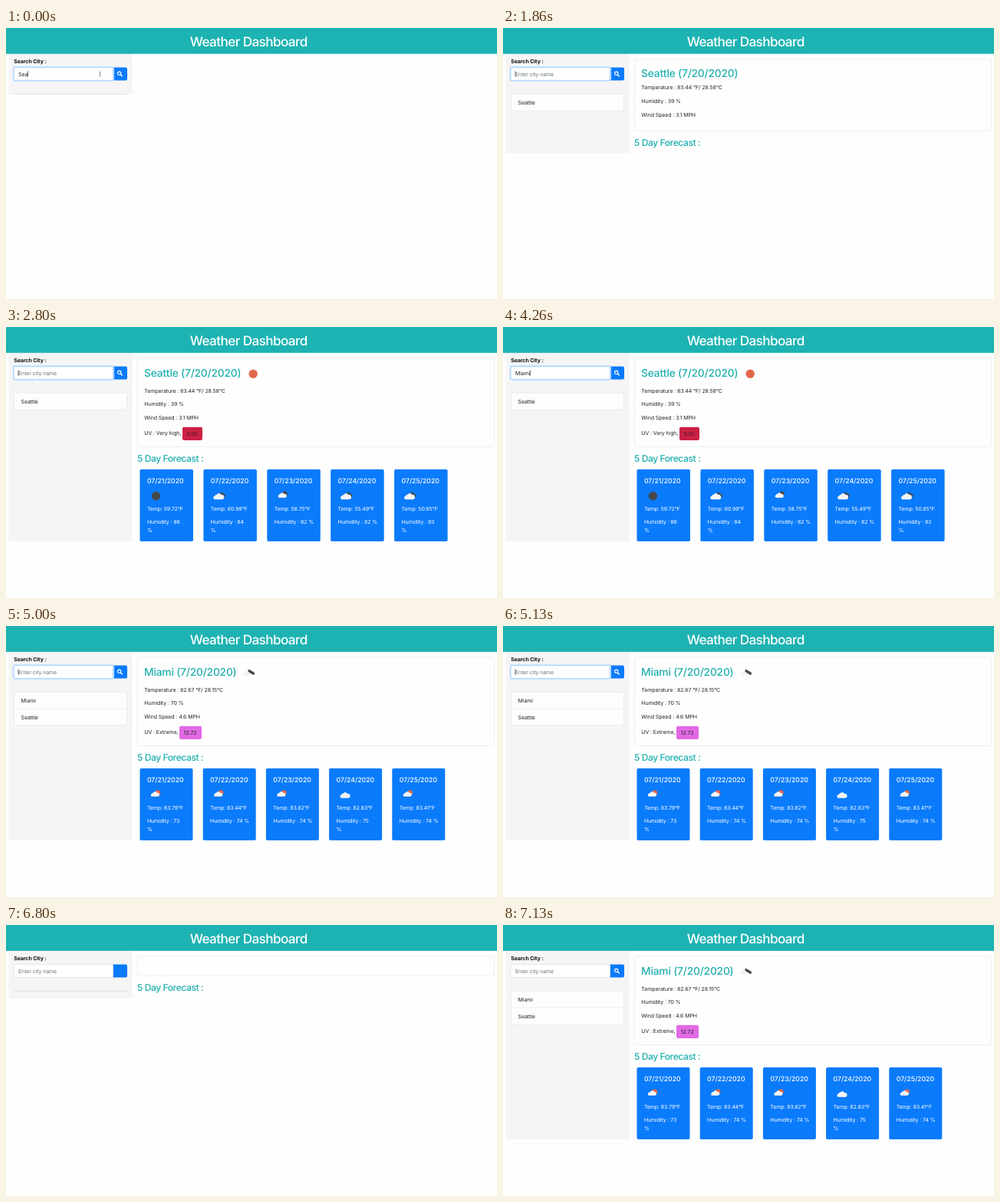
Animation of 640x354 px, one loop 8000 ms. Source, as an HTML page:

```html
<!DOCTYPE html>
<html lang="en">
<head>
<meta charset="utf-8">
<title>Weather Dashboard</title>
<style>
  html, body { margin: 0; width: 100%; height: 100%; overflow: hidden; background: #fefefe; }
  svg { display: block; width: 640px; height: 354px; }
  text {
    font: 400 7px Inter, "Liberation Sans", sans-serif;
    letter-spacing: -.014em;
    fill: #212529;
    text-rendering: geometricPrecision;
    white-space: pre;
  }
  .h1 { font-size: 17.2px; font-weight: 500; letter-spacing: -.036em; fill: #fff; text-anchor: middle; }
  .h2 { font-size: 13.8px; font-weight: 500; letter-spacing: -.014em; fill: #1fb0ae; }
  .h3 { font-size: 12.1px; font-weight: 500; letter-spacing: -.036em; fill: #1fb0ae; }
  .label { font-weight: 700; fill: #111; }
  .hint { fill: #6c757d; }
  .date { font-size: 8.7px; font-weight: 500; letter-spacing: 0; fill: #fff; }
  .white { fill: #fff; }
</style>
</head>
<body>
<svg id="stage" viewBox="0 0 640 354"></svg>
<script>
const LOOP = 8000, BLUE = '#0a7bfb', DARK = '#48484a', SUN = '#e2674a';
const stage = document.getElementById('stage');

const cities = {
  Seattle: {
    lines: ['Temperature : 83.44 °F/ 28.58°C', 'Humidity : 39 %', 'Wind Speed : 3.1 MPH'],
    uv: ['UV : Very high,', '8.05', 230, 26, '#cb2145', '#4a1526'],
    icon: () => disc(322.2, 61.3, 5.7, SUN),
    pitch: 82.9, width: 69.5,
    days: [['moon', 59.72, 86, 1], ['broken', 60.98, 84, 1], ['night', 58.75, 82], ['broken', 55.49, 82], ['broken', 50.85, 83, 1]]
  },
  Miami: {
    lines: ['Temperature : 82.67 °F/ 28.15°C', 'Humidity : 70 %', 'Wind Speed : 4.6 MPH'],
    uv: ['UV : Extreme,', '12.72', 226, 29, '#e069e4', '#212529'],
    icon: () => cloud(314.5, 62, .62, '#f1f1f1') + streak(317, 58.6, 322.4, 62),
    pitch: 82.2, width: 69,
    days: [['rain', 83.79, 73, 1], ['rain', 83.44, 74], ['rain', 83.82, 74], ['cloudy', 82.83, 75, 1], ['rain', 83.41, 74]]
  }
};

// Each step: start time and the properties that change there.
const blank = { typed: '', caret: 0, focus: 1, mouse: 0, icon: 1, list: [], city: '', detail: '', forecast: '', main: 0 };
const steps = [
  [0, { typed: 'Sea', caret: 1, mouse: 1 }],
  [460, { typed: 'Seat' }],
  [600, { typed: 'Seatt' }],
  [1000, { typed: 'Seattl' }],
  [1200, { typed: 'Seattle' }],
  [1660, { caret: 0 }],
  [1800, { typed: '', caret: 1, mouse: 0 }],
  [1860, { main: 1, city: 'Seattle', list: ['Seattle'] }],
  [1930, { detail: 'Seattle', forecast: 'Seattle' }],
  [2260, { caret: 0 }],
  [2800, { caret: 1 }],
  [3260, { caret: 0 }],
  [3460, { typed: 'M', caret: 1 }],
  [3660, { typed: 'Mi' }],
  [3860, { typed: 'Mia' }],
  [4130, { typed: 'Miam' }],
  [4260, { typed: 'Miami' }],
  [4730, { typed: '' }],
  [4860, { city: 'Miami', list: ['Miami', 'Seattle'] }],
  [5000, { detail: 'Miami', forecast: 'Miami' }],
  [5260, { caret: 0 }],
  [5730, { caret: 1 }],
  [6260, { caret: 0 }],
  [6800, { focus: 0, icon: 0, list: [], city: '', detail: '', forecast: '' }],
  [6860, { icon: 1, city: 'Miami', list: ['Miami', 'Seattle'] }],
  [7000, { detail: 'Miami', forecast: 'Miami' }]
];
let last = blank;
const states = steps.map(([, change]) => last = { ...last, ...change });

const text = (x, y, s, cls = '') => `<text x="${x}" y="${y}" class="${cls}">${s}</text>`;
const box = (x, y, w, h, fill, r = 0, stroke = 'none', sw = .5) =>
  `<rect x="${x}" y="${y}" width="${w}" height="${h}" rx="${r}" fill="${fill}" stroke="${stroke}" stroke-width="${sw}"/>`;
const disc = (x, y, r, fill) => `<circle cx="${x}" cy="${y}" r="${r}" fill="${fill}"/>`;
const line = (d, stroke, sw, cap = 'butt') =>
  `<path d="${d}" fill="none" stroke="${stroke}" stroke-width="${sw}" stroke-linecap="${cap}"/>`;
const streak = (x1, y1, x2, y2) => line(`M${x1} ${y1}L${x2} ${y2}`, DARK, 3.3, 'round');
const cloud = (x, y, k, fill) =>
  `<path transform="translate(${x} ${y}) scale(${k})" fill="${fill}" d="M-6 4a2.6 2.6 0 0 1 0-5a3 3 0 0 1 3-2a3.6 3.6 0 0 1 6.4 .4a3.3 3.3 0 0 1 1.6 6.6z"/>`;

const icons = {
  moon: x => disc(x + 21, 220.7, 5.7, DARK),
  broken: x => streak(x + 23, 217.6, x + 27, 220.4) + cloud(x + 20, 221.6, .9, '#f4f4f4'),
  night: x => disc(x + 23, 218.2, 3.4, DARK) + cloud(x + 20, 220, .72, '#f4f4f4'),
  rain: x => disc(x + 23.3, 217.8, 3.4, SUN) + cloud(x + 20, 219.8, .72, '#f4f4f4') +
    line(`M${x + 17} 223.2l-.6 1M${x + 20} 223.2l-.6 1M${x + 23} 223.2l-.6 1`, DARK, .6),
  cloudy: x => cloud(x + 21, 221.4, .85, '#f4f4f4')
};

function sidebar(s) {
  const end = s.detail ? 280 : s.city ? 163.5 : s.main ? 96 : 87;
  let out = box(3.5, 34, 161.3, end - 34, '#f5f5f5') + text(10.2, 45.5, 'Search City :', 'label');

  out += `<path d="M139.5 51.5H156a2 2 0 0 1 2 2V66.5a2 2 0 0 1-2 2H139.5z" fill="${BLUE}"/>`;
  if (s.icon) out += `<circle cx="147.7" cy="59.3" r="2.2" fill="none" stroke="#fff" stroke-width="1.1"/>` +
    line('M149.4 61l2 2', '#fff', 1.3, 'round');
  if (s.focus) out += box(9.5, 51, 130.9, 18, 'none', 2.3, '#bfdeff', 1.4);
  out += box(10.2, 51.7, 129.4, 16.6, '#fff', 1.6, s.focus ? '#80bdff' : '#ced4da');
  out += s.typed ? `<text id="typed" x="16" y="62.6">${s.typed}</text>` : text(16, 62.6, 'Enter city name', 'hint');
  if (s.caret) out += '<path id="caret" d="M16.1 56.3v7.4" stroke="#111" stroke-width=".6"/>';
  if (s.mouse) out += line('M121.3 57q1.2 0 1.2 .8v4.6q0 .8-1.2 .8M123.7 57q-1.2 0-1.2 .8v4.6q0 .8 1.2 .8', '#777', .6);

  if (!s.list.length) return out + line('M10.2 86.3H157.8', '#d6d6d6', .7);
  out += box(10.4, 86.2, 147.2, 21.8 * s.list.length, '#fdfdfd', 2, '#dcdcdc');
  s.list.forEach((name, i) => {
    if (i) out += line(`M10.4 ${86.2 + 21.8 * i}h147.2`, '#dcdcdc', .5);
    out += text(19.6, 99.9 + 21.8 * i, name);
  });
  return out;
}

function weather(s) {
  if (!s.main) return '';
  const bottom = s.detail ? 156.5 : s.city ? 134.3 : 66.3;
  let out = box(171.3, 40.8, 465, bottom - 40.8, '#fefefe', 2, '#dcdfdd');
  out += text(171, bottom + 19.6, '5 Day Forecast :', 'h3');
  if (!s.city) return out;

  const city = cities[s.city], shift = s.detail ? 5.3 : 0;
  out += text(180, s.detail ? 65.2 : 64, s.city + ' (7/20/2020)', 'h2');
  city.lines.forEach((l, i) => out += text(180.3, 80.4 + shift + 17.75 * i, l));
  if (s.detail) {
    const d = cities[s.detail], [label, value, x, w, fill, ink] = d.uv;
    out += d.icon() + text(180.3, 141, label) + box(x, 130.7, w, 17.2, fill, 1.8) +
      `<text x="${x + 5.8}" y="141.9" style="fill:${ink}">${value}</text>`;
  }
  return out;
}

function forecast(s) {
  if (!s.forecast) return '';
  const { pitch, width, days } = cities[s.forecast];
  return days.map(([icon, temp, wet, wrap], i) => {
    const x = 174.5 + pitch * i, tx = x + 9.4;
    return box(x, 186, width, 94, BLUE, 1.8) +
      text(tx, 203.7, `07/${21 + i}/2020`, 'date') + icons[icon](x) +
      text(tx, 239.6, `Temp: ${temp}°F`, 'white') +
      text(tx, 257.4, `Humidity : ${wet}${wrap ? '' : ' %'}`, 'white') +
      (wrap ? text(tx, 268.2, '%', 'white') : '');
  }).join('');
}

function render(s) {
  stage.innerHTML = box(0, 0, 640, 354, '#fefefe') + box(0, 0, 640, 33.8, '#1db3b2') +
    text(316.2, 23.7, 'Weather Dashboard', 'h1') + sidebar(s) + weather(s) + forecast(s);
  const typed = document.getElementById('typed'), caret = document.getElementById('caret');
  if (typed && caret) caret.setAttribute('transform', `translate(${typed.getComputedTextLength() + .1} 0)`);
}

let shown = -1;
function tick() {
  const t = performance.now() % LOOP;
  const i = steps.findLastIndex(([start]) => start <= t);
  if (i !== shown) render(states[shown = i]);
  requestAnimationFrame(tick);
}
tick();
</script>
</body>
</html>
```
